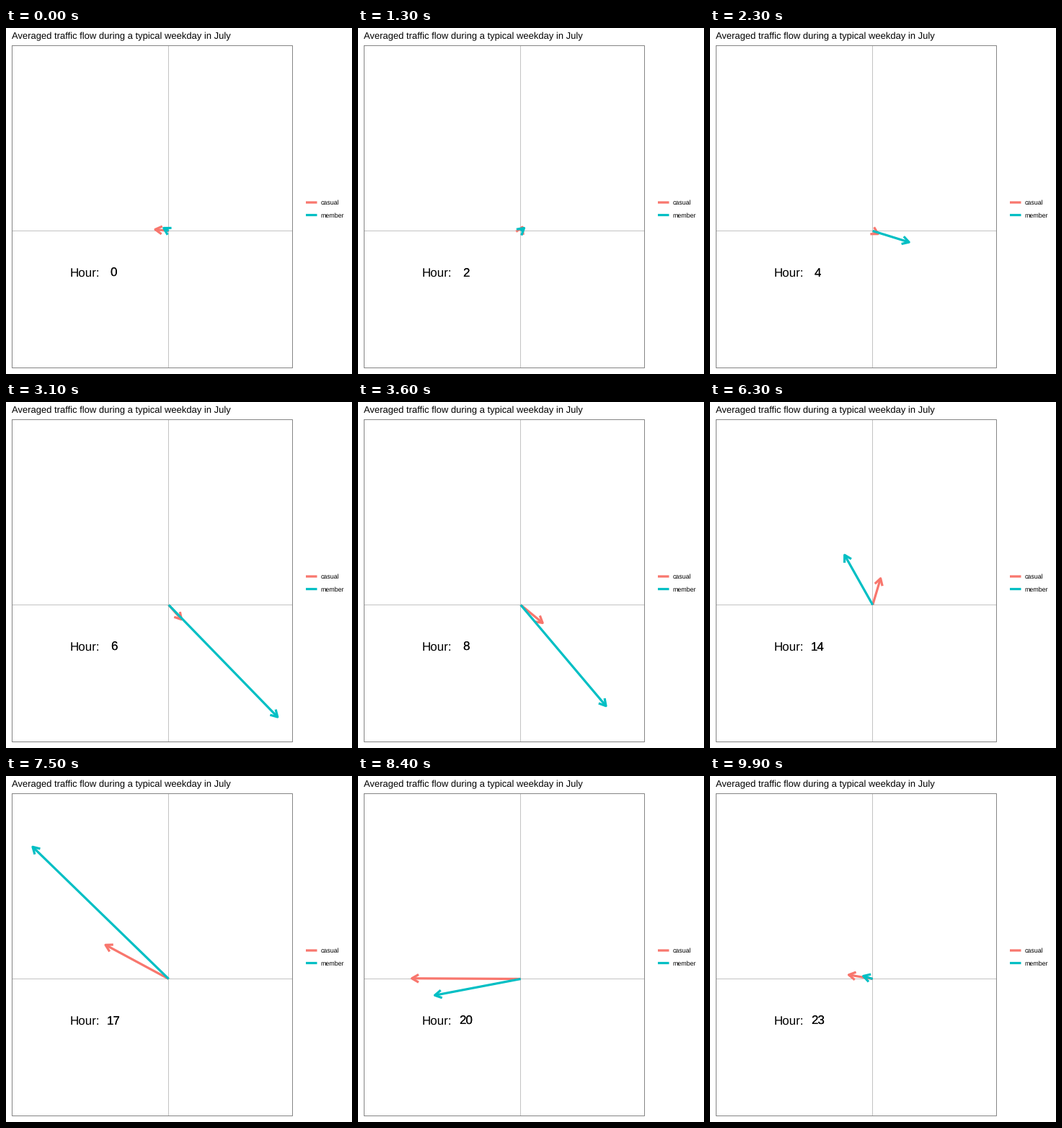
A matplotlib script for the animation above (10000 ms loop, 480 by 480 pixels).

```python
import numpy as np
import matplotlib.pyplot as plt
from matplotlib.animation import FuncAnimation

plt.rcParams.update({"font.family": "Liberation Sans", "text.hinting": "none"})

SIZE, DPI = 480, 72
FRAMES, INTERVAL = 100, 100
CORAL, TEAL = "#F8766D", "#00BFC4"
BASE = np.array([225.2, 281.0])
HEAD, SPREAD, WIDTH = 10.8, np.radians(30), 3.2

hours = np.arange(24)
# Each hour ends with one halfway frame
MIDWAY = 3 + 4 * hours + np.minimum(hours, 4)


def wave(height, peak, rise, fall):
    """Bell over the 24-hour clock with its own rise and fall widths."""
    gap = (hours - peak + 12) % 24 - 12
    return height * np.exp(-(gap / np.where(gap < 0, rise, fall)) ** 2)


def tips(x, y):
    return BASE + np.column_stack([x, y])


casual = tips(
    2 + wave(62, 12.5, 5.1, 1.87) + wave(-153, 20, 3.42, 2.83),
    2 + wave(-10, 2.5, 0.9, 0.9) + wave(25, 7.5, 1.87, 1.73)
    + wave(-66, 16.5, 2.74, 1.95) + wave(-16, 22, 0.9, 1.7))
member = tips(
    5 + wave(155, 6.5, 1.72, 2.68) + wave(-207, 16.45, 1.45, 4.47)
    + wave(-14, 20, 0.8, 0.8),
    -4 + wave(179, 6.6, 1.27, 3.01) + wave(-238, 16.6, 1.76, 1.82)
    + wave(34, 20, 0.8, 0.8))

fig = plt.figure(figsize=(SIZE / DPI, SIZE / DPI), dpi=DPI, facecolor="white")
ax = fig.add_axes([0, 0, 1, 1])
# Whole numbers fall on pixel centres
ax.set(xlim=(-0.5, SIZE - 0.5), ylim=(SIZE - 0.5, -0.5))
ax.axis("off")


def line(xs, ys, color, width):
    return ax.plot(xs, ys, color=color, lw=width, solid_capstyle="butt",
                   solid_joinstyle="round", snap=False)[0]


def label(x, y, text, size, ha="left"):
    return ax.text(x, y, text, fontsize=size, ha=ha, va="baseline", color="black")


line([225, 225], [24, 471], "#C3C3C3", 1)
line([8, 397], [281, 281], "#C3C3C3", 1)
line([8, 397, 397, 8, 8, 8], [24, 24, 471, 471, 24, 25], "#858585", 1)

label(7.5, 14.5, "Averaged traffic flow during a typical weekday in July", 13)
for y, name, color in ((241.5, "casual", CORAL), (259, "member", TEAL)):
    line([415.5, 431], [y, y], color, WIDTH)
    label(436, y + 3.2, name, 8.9)

label(109.3, 344.5, "Hour:", 17, "center")
# Overprinting makes the digits heavier
digits = [label(149, 344.5, "", 17, "center") for _ in range(2)]


def make_arrow(color):
    return line([], [], color, WIDTH), line([], [], color, WIDTH)


def set_arrow(arrow, tip):
    shaft, head = arrow
    shaft.set_data(*zip(BASE, tip))
    back = np.arctan2(*(BASE - tip)[::-1])
    a, b = (tip + HEAD * np.array([np.cos(t), np.sin(t)])
            for t in (back - SPREAD, back + SPREAD))
    head.set_data(*zip(a, tip, b))


arrows = [(make_arrow(CORAL), casual), (make_arrow(TEAL), member)]


def update(frame):
    hour = int(np.sum(MIDWAY < frame))
    mix = 0.5 if frame == MIDWAY[hour] else 0
    for arrow, path in arrows:
        set_arrow(arrow, (1 - mix) * path[hour] + mix * path[(hour + 1) % 24])
    for text in digits:
        text.set_text(str(hour))
    return []


anim = FuncAnimation(fig, update, frames=FRAMES, interval=INTERVAL,
                     init_func=lambda: update(0), repeat=True, repeat_delay=0)
plt.show()
```
